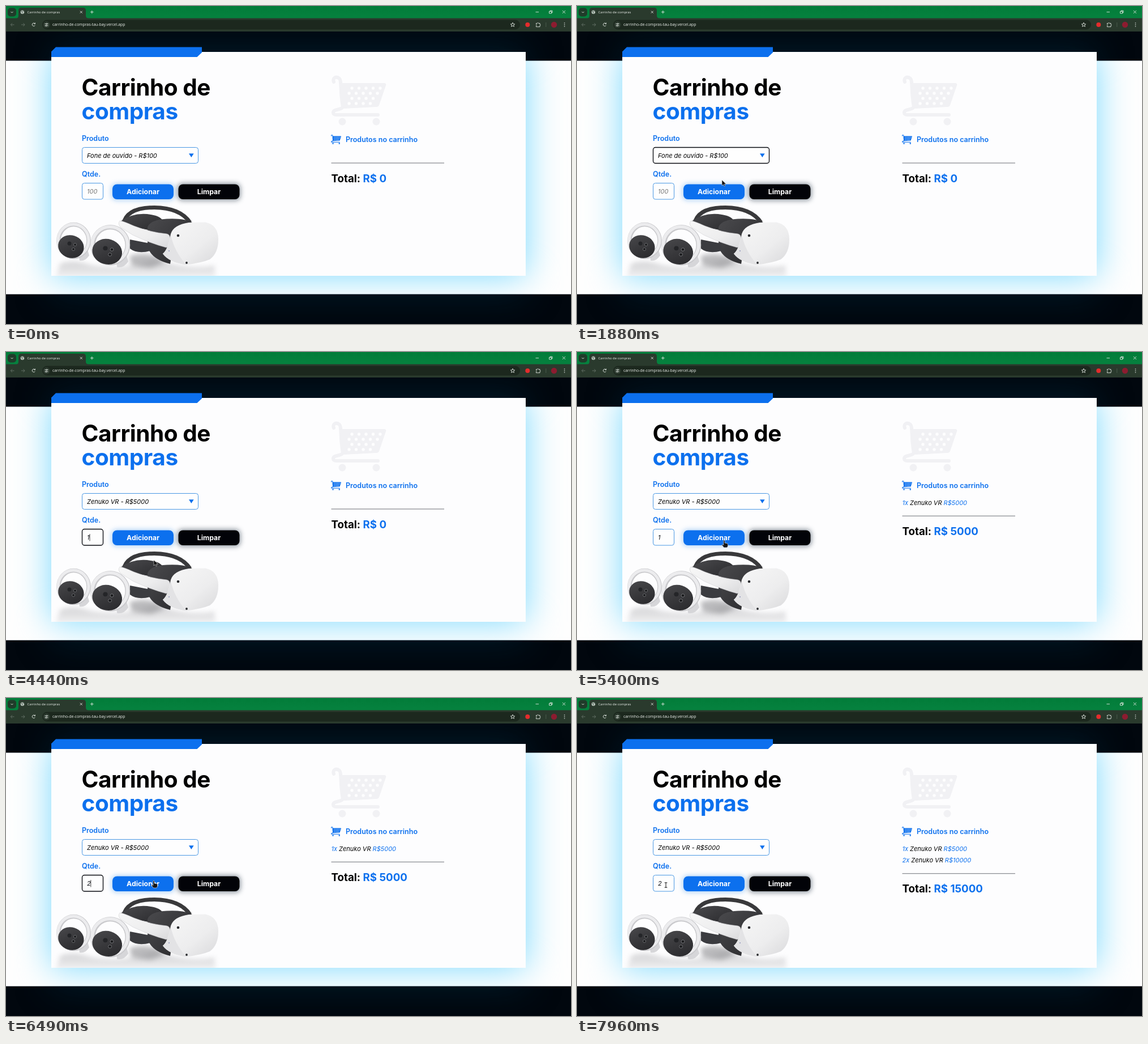
Recreate the animation shown at these times as an HTML page. Size 998 by 561 pixels, loop 8000 ms.

```html
<!DOCTYPE html>
<html lang="pt-BR">
<head>
<meta charset="utf-8">
<title>Carrinho de compras</title>
<style>
html, body { margin: 0; width: 100%; height: 100%; overflow: hidden; background: #fefefe }
svg { display: block; width: 998px; height: 561px; font-family: Inter, sans-serif }
text { white-space: pre }
.ui { font-family: "Open Sans", sans-serif; fill: #eef2ee }
.line { fill: none; stroke: #e4e9e4; stroke-width: .9 }
.dim { stroke: #68746a }
.title { font-size: 40.5px; font-weight: 700; letter-spacing: -.45px }
.label { font-size: 12.5px; font-weight: 600 }
.entry { font-size: 11px; font-style: italic }
.button { font-size: 12.3px; font-weight: 700; fill: #fff; text-anchor: middle }
.total { font-size: 18.7px; font-weight: 700 }
.blue { fill: #0c70ee }
.field { fill: #fefefe; stroke: #4a98e4 }
.field.focus { stroke: #080a10; stroke-width: 1.35 }
.glow { fill: #7adaff; filter: blur(31px) }
.bandglow { fill: #00283c; filter: blur(32px); opacity: .55 }
.soft { filter: blur(4px) }
</style>
</head>
<body>
<svg viewBox="0 0 998 561">
<defs>
  <g id="cart">
    <path d="M4 12C1 5 8 1 14 6C18 10 15 30 20 56C18 62 3 59 3 66C3 70 6 70 9 70H82" fill="none" stroke="currentColor" stroke-width="6" stroke-linecap="round" stroke-linejoin="round"/>
    <path d="M16 14H93Q97 14 96 18L84 53Q83 56 79 56L21 59Z" fill="currentColor"/>
    <circle cx="19" cy="82" r="6.5" fill="currentColor"/>
    <circle cx="79" cy="82" r="6.5" fill="currentColor"/>
    <g id="holes" fill="#fdfdfe"/>
  </g>
  <linearGradient id="shell" x1="0" y1="0" x2="1" y2="1">
    <stop stop-color="#f7f7f7"/><stop offset=".6" stop-color="#ededee"/><stop offset="1" stop-color="#d9d9db"/>
  </linearGradient>
  <linearGradient id="dark" x1="0" y1="0" x2="1" y2="1">
    <stop stop-color="#4a4a4d"/><stop offset="1" stop-color="#27272a"/>
  </linearGradient>
  <linearGradient id="floor" x1="0" y1="0" x2="0" y2="1">
    <stop stop-color="#b8b8bb"/><stop offset="1" stop-color="#e8e8ea"/>
  </linearGradient>
  <linearGradient id="bar" x1="0" y1="0" x2="0" y2="1">
    <stop stop-color="#027c39"/><stop offset="1" stop-color="#06823f"/>
  </linearGradient>
  <clipPath id="bands"><path d="M0 45H998V96.500H0ZM0 508.500H998V561H0Z"/></clipPath>
  <clipPath id="cardClip"><path d="M80 81H918V476H80Z"/></clipPath>
</defs>

<rect width="998" height="561" fill="#fefefe"/>
<rect class="glow" x="80" y="81" width="838" height="395"/>
<g clip-path="url(#bands)">
  <rect width="998" height="561" fill="#01070e"/>
  <rect class="bandglow" x="80" y="70" width="838" height="445"/>
</g>
<rect x="80" y="81" width="838" height="395" fill="#fdfdfe"/>
<path class="blue" d="M80 90V80.500L88 72.500H346V82L337.500 90Z"/>

<g id="browser">
  <rect width="998" height="22" fill="url(#bar)"/>
  <path d="M0 21.500H18Q22 21.500 22 17V8Q22 3 27 3H136Q141 3 141 8V17Q141 21.500 146 21.500H998V45H0Z" fill="#2a3a2d"/>
  <rect x="3" y="3.500" width="15" height="15" rx="5" fill="#203c2a"/>
  <path class="line" d="M8.500 10L10.500 12L12.500 10M130.800 8.700L134.800 12.700M134.800 8.700L130.800 12.700M149 10.700H154.600M151.800 7.900V13.500M935.500 10.700H941M959.500 9.500H963.500V13H959.500ZM961 9.500V8.200H965V11.800H963.500M983 8L988 13M988 8L983 13"/>
  <circle cx="29" cy="10.700" r="3.300" fill="#b9c5bc"/>
  <path d="M26.500 9L29 9.500L28 11L30 13M29.500 7.500L32 10" fill="none" stroke="#405044" stroke-width=".9"/>
  <text class="ui" x="37.500" y="12.800" font-size="5.900">Carrinho de compras</text>
  <path class="line dim" d="M14.500 33H8.500M11 30.300L8.300 33L11 35.700M27 33H33M30.500 30.300L33.200 33L30.500 35.700"/>
  <path class="line" d="M51 31A2.700 2.700 0 1 0 51.400 34M51.500 29.500V31.500H49.500"/>
  <rect x="64" y="24.500" width="844" height="17" rx="8.500" fill="#1c281e"/>
  <circle cx="71.500" cy="33" r="6" fill="#2d3b30"/>
  <path class="line" d="M68.500 31.500H71M73 31.500H74.500M68.500 34.700H70M72 34.700H74.500M71 31.500a1 1 0 1 0 2 0a1 1 0 1 0 -2 0M70 34.700a1 1 0 1 0 2 0a1 1 0 1 0 -2 0"/>
  <text class="ui" x="82" y="35.300" font-size="6.900">carrinho-de-compras-tau-bay.vercel.app</text>
  <path class="line" d="M895 29.300L896.100 31.800L898.700 32L896.700 33.700L897.400 36.300L895 34.900L892.600 36.300L893.300 33.700L891.300 32L893.900 31.800Z"/>
  <circle cx="921.300" cy="33" r="4" fill="#e42c2c"/>
  <path class="line" d="M936.500 30.500H938.500Q939.500 28 940.500 30.500H943V32.500Q945.500 33.500 943 34.500V36.700H936.500V34.500Q938.500 33.500 936.500 32.300Z"/>
  <path d="M953.800 29V37" stroke="#4a5c4d"/>
  <circle cx="968" cy="33" r="5.200" fill="#8c1c30"/>
  <g fill="#e4e9e4"><circle cx="986.500" cy="30" r=".8"/><circle cx="986.500" cy="33" r=".8"/><circle cx="986.500" cy="36" r=".8"/></g>
</g>

<text class="title" x="133.500" y="158">Carrinho de</text>
<text class="title blue" x="133.500" y="200">compras</text>
<text class="label blue" x="134" y="237.500">Produto</text>
<rect class="field" id="select" x="134.500" y="249.500" width="205" height="28" rx="4"/>
<text class="entry" id="choice" x="143" y="267.600"></text>
<path class="blue" d="M323 260.300H331.700L327.350 267Z"/>
<text class="label blue" x="134" y="301.300">Qtde.</text>
<rect class="field" id="quantity" x="134.500" y="312.500" width="37" height="28.500" rx="4"/>
<text class="entry" id="amount" x="143" y="331"></text>
<path id="caret" d="M0 321V333.500" stroke="#111" stroke-width=".8"/>
<rect class="soft" x="186" y="313" width="112" height="30" rx="9" fill="#7fb8f0" opacity=".6"/>
<rect class="soft" x="302.500" y="312.500" width="112" height="31" rx="9" fill="#4a5866" opacity=".6"/>
<rect class="blue" x="188" y="314.500" width="108" height="26.500" rx="8"/>
<rect x="304.500" y="314.500" width="108" height="26.500" rx="8" fill="#020308"/>
<text class="button" x="242" y="332.200">Adicionar</text>
<text class="button" x="358.500" y="332.200">Limpar</text>

<use href="#cart" transform="translate(575 122)" color="#f1f1f4"/>
<use href="#cart" transform="translate(574 226.800) scale(.187 .192)" color="#0c70ee"/>
<text class="label blue" x="600" y="239.500">Produtos no carrinho</text>
<g id="items"></g>
<g id="summary">
  <path d="M574.500 277H774" stroke="#6c6f76" stroke-width="1.100"/>
  <text class="total" x="574.500" y="310.800">Total: <tspan class="blue" id="sum"></tspan></text>
</g>

<g id="headset" clip-path="url(#cardClip)">
  <path d="M88 478L96 454Q120 447 150 457Q190 464 230 456L262 446Q320 466 368 458L370 478Z" fill="url(#floor)" opacity=".65" class="soft"/>
  <path d="M218 441Q256 430 282 452L256 462L222 458Z" fill="#98989b" class="soft" opacity=".65"/>
  <path d="M207 386Q212 355.500 262 355.500Q308 356 325 382" fill="none" stroke="#39393b" stroke-width="7"/>
  <path d="M202 380Q226 363 256 368Q276 371 279 383L276 400L236 392Q206 394 202 380Z" fill="url(#dark)"/>
  <path d="M250 390Q255 377 284 375.500Q316 374 329 382L300 396L290 455Q257 447 250 425Z" fill="url(#dark)"/>
  <path d="M219 412L255 419V432Q232 438 219 428Z" fill="#3b3c40"/>
  <path d="M201 379Q197 384 202 390L224 404Q256 419 283 426Q289 425 290 412Q290 403 284 402Q254 399 226 388Q206 379 201 379Z" fill="url(#shell)" stroke="#d0d0d3" stroke-width=".6"/>
  <path d="M291 402Q296 386 323 382L352 381.500Q375 386 375 412Q375 436 360 447Q346 453 318 456.500Q286 450 277 437Q286 430 291 402Z" fill="url(#shell)"/>
  <path d="M291 404Q297 432 318 456.500Q287 452 277 437Q286 430 291 404Z" fill="#e3e3e5"/>
  <circle cx="304" cy="405" r="2.300" fill="#2a2b2e"/>
  <circle cx="319" cy="453" r="1.900" fill="#2a2b2e"/>
  <circle cx="288" cy="432" r="1" fill="#8f96ba"/>

  <g id="controller">
    <path d="M129 443L144 430L147 440Q140 451 130 449Z" fill="#d6d6d9"/>
    <ellipse cx="119.500" cy="414" rx="26.500" ry="28.500" fill="none" stroke="#cacacd" stroke-width="7.500"/>
    <ellipse cx="119" cy="413.500" rx="27" ry="28.500" fill="none" stroke="#ececee" stroke-width="5"/>
    <ellipse cx="115" cy="424.500" rx="23" ry="20" transform="rotate(18 115 424)" fill="url(#dark)"/>
    <circle cx="112" cy="419" r="3.500" fill="#242528"/>
    <g fill="#18191b" stroke="#85868a" stroke-width=".7"><circle cx="122" cy="421" r="2.500"/><circle cx="119" cy="429" r="2.500"/></g>
  </g>
  <use href="#controller" transform="translate(45.500 -39) scale(1.160 1.113)"/>
</g>

<g id="pointer" stroke-linejoin="round">
  <path id="arrow" d="M0 0V10L2.400 7.800L4 11L5.700 10.200L4.200 7.200H7.500Z" fill="#111" stroke="#ddd" stroke-width=".6"/>
  <path id="hand" d="M-1.200 1Q0 -1 1.200 1V5L5 5.500Q6.800 6 6.800 8Q6.800 11 5 13H-.5L-4 8.500Q-4 6.500 -1.200 8.500Z" fill="#151618" stroke="#d6dbe2" stroke-width=".7"/>
  <path id="beam" d="M-2.300 -4.300H2.300M0 -4.300V4.300M-2.300 4.300H2.300" fill="none" stroke="#555" stroke-width="1.400"/>
</g>
</svg>

<script>
const DURATION = 8000;
const PRODUCT = "Zenuko VR";
const $ = id => document.getElementById(id);

// time, x, y of the pointer's hot spot
const path = [
  [580, 330, 561], [1370, 290, 266], [1470, 290, 266], [1880, 256, 307],
  [2360, 255, 307], [2530, 257, 317], [2770, 257, 317], [3100, 238, 326],
  [3450, 220, 323], [3590, 214, 324], [3850, 152, 329], [3980, 152, 329],
  [4340, 261, 367], [4440, 261, 367], [4890, 260, 332], [5400, 260, 332],
  [5780, 153, 329], [6190, 153, 329], [6490, 261, 322], [6640, 260, 330],
  [7080, 260, 332], [7350, 232, 341], [7860, 158, 331], [7960, 157, 330]
];

const between = (t, from, to) => t >= from && t < to;
const inside = (x, y, left, top, right, bottom) => x >= left && x <= right && y >= top && y <= bottom;
const show = (id, visible) => $(id).setAttribute("visibility", visible ? "visible" : "hidden");

function setMarkup(id, markup) {
  const node = $(id);
  if (node.markup !== markup) node.innerHTML = node.markup = markup;
}

function pointerAt(t) {
  const next = path.findIndex(key => key[0] > t);
  if (next < 0) return path.at(-1).slice(1);
  if (next === 0) return path[0].slice(1);
  const [t0, x0, y0] = path[next - 1], [t1, x1, y1] = path[next];
  const u = (t - t0) / (t1 - t0), ease = u * u * (3 - 2 * u);
  return [x0 + (x1 - x0) * ease, y0 + (y1 - y0) * ease];
}

function drawPointer(t) {
  const [x, y] = pointerAt(t);
  const menuOpen = between(t, 1400, 2770);
  const overButton = inside(x, y, 188, 314, 296, 341) || inside(x, y, 304, 314, 413, 341);
  const overInput = inside(x, y, 134, 312, 172, 341);
  const shape = menuOpen ? "arrow" : overButton ? "hand" : overInput ? "beam" : "arrow";
  for (const id of ["arrow", "hand", "beam"]) show(id, t >= 580 && id === shape);
  $("pointer").setAttribute("transform", `translate(${x} ${y})`);
}

function drawForm(t) {
  const typed = t < 4440 ? "" : t < 6220 ? "1" : "2";
  const focusTime = between(t, 3900, 5400) ? 3900 : between(t, 5800, 6800) ? 5800 : 0;
  $("select").classList.toggle("focus", between(t, 1400, 3900));
  $("quantity").classList.toggle("focus", focusTime > 0);
  $("choice").textContent = t < 2770 ? "Fone de ouvido - R$100" : `${PRODUCT} - R$5000`;
  $("amount").textContent = typed || "100";
  $("amount").setAttribute("fill", typed ? "#101218" : "#777");
  const lastKey = t >= 6220 ? 6220 : t >= 4440 && t < 5400 ? 4440 : focusTime;
  show("caret", focusTime && (t - lastKey) % 1000 < 500);
  $("caret").setAttribute("transform", `translate(${typed === "2" ? 149.8 : typed ? 148 : 143.5} 0)`);
}

function drawCart(t) {
  const counts = [[5400, 1], [6800, 2]].filter(([time]) => t >= time).map(([, count]) => count);
  setMarkup("items", counts.map((count, i) =>
    `<text class="entry" x="574.5" y="${270 + i * 20.4}"><tspan class="blue">${count}x</tspan> ${PRODUCT} <tspan class="blue">R$${count * 5000}</tspan></text>`
  ).join(""));
  const total = counts.reduce((sum, count) => sum + count * 5000, 0);
  $("sum").textContent = "R$ " + total;
  $("summary").setAttribute("transform", `translate(0 ${[0, 12.2, 32.7][counts.length]})`);
}

function frame(now) {
  const t = now % DURATION;
  drawForm(t);
  drawCart(t);
  drawPointer(t);
  requestAnimationFrame(frame);
}

let holes = "";
for (let row = 0; row < 4; row++)
  for (let col = 0; col < 5 - (row > 1); col++)
    holes += `<circle cx="${36 + col * 12.5 - (row % 2) * 5}" cy="${23 + row * 9}" r="2.7"/>`;
$("holes").innerHTML = holes;
frame(performance.now());
</script>
</body>
</html>
```
